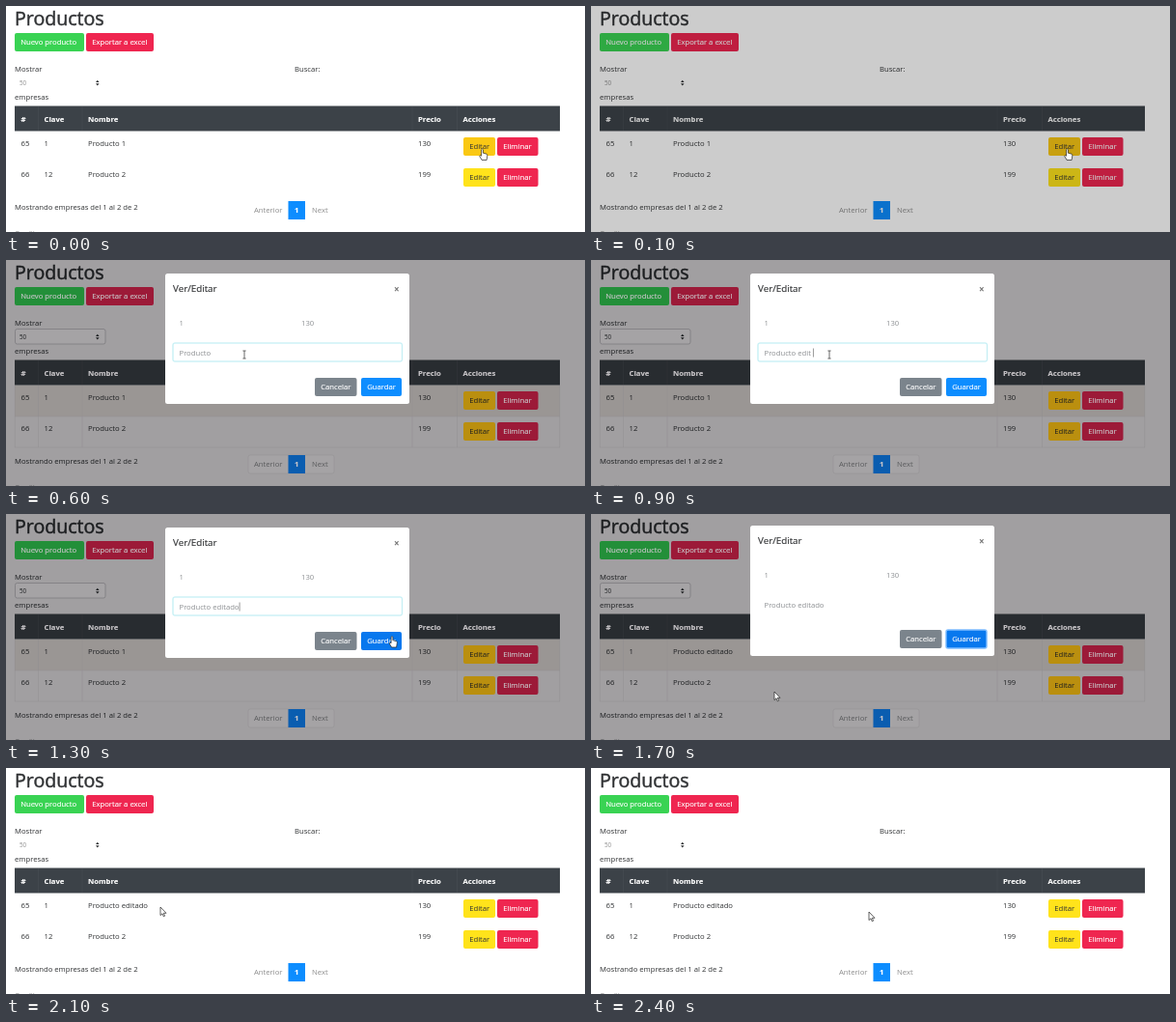
An HTML page for the animation above (2500 ms loop, 600x234 px).

```html
<!DOCTYPE html>
<html lang="es">
<head>
<meta charset="utf-8">
<title>Productos</title>
<style>
  html, body { margin: 0; width: 100%; height: 100%; overflow: hidden; background: #fff; }
  svg { display: block; width: 600px; height: 234px; }
  text { font: 7.7px "Open Sans", "Noto Sans", sans-serif; fill: var(--ink); white-space: pre; }
  svg {
    --page: #fff; --ink: #303234; --stripe: #fff; --line: #fff; --field: #fff;
    --muted: #8c8c8c; --head: #3c4248; --headline: #484f55; --green: #39d353;
    --red: #ef2650; --yellow: #ffe31b; --hover: #fac814; --blue: #0d8dff; --label: #fff;
  }
  svg.dim .page {
    --page: #a19fa1; --ink: #1c1e20; --stripe: #9a9694; --line: #908e90; --field: #a5a3a5;
    --muted: #5a5b5d; --head: #282c30; --headline: #33373b; --green: #238f39;
    --red: #9c1a38; --yellow: #ba8f0f; --hover: #a07c0e; --blue: #0a5db0; --label: #c9c6c9;
  }
  .title { font-size: 19.6px; stroke: var(--ink); stroke-width: .45px; }
  .heading { font-size: 9.8px; stroke: var(--ink); stroke-width: .15px; }
  .bold { font-weight: 700; }
  .label { fill: var(--label); stroke: var(--label); stroke-width: .15px; }
  .muted { fill: var(--muted); }
  .small { font-size: 6.3px; }
  .value { fill: #8c8f92; }
</style>
</head>
<body>
<svg id="stage" viewBox="0 0 600 234"></svg>
<script>
const LOOP = 2500, STEP = 100;
const stage = document.getElementById('stage');

const text = (x, y, str, cls = '', extra = '') =>
  `<text x="${x}" y="${y}" class="${cls}" ${extra}>${str}</text>`;
const rect = (x, y, w, h, fill, extra = '') =>
  `<rect x="${x}" y="${y}" width="${w}" height="${h}" fill="${fill}" ${extra}/>`;
const button = (x, y, w, label, fill, cls = 'label', extra = '') =>
  rect(x, y, w, 19, fill, `rx="2" ${extra}`) + text(x + 6.2, y + 12.4, label, cls);

const columns = [[15.5, '#'], [39.5, 'Clave'], [85, 'Nombre'], [427, 'Precio'], [473.5, 'Acciones']];

function row(y, id, key, name, price, editFill, editExtra) {
  const cells = [id, key, name, price].map((v, i) => text(columns[i][0], y + 15, v)).join('');
  return cells + button(474, y + 6, 33, 'Editar', editFill, '', editExtra) +
    button(509, y + 6, 42.5, 'Eliminar', 'var(--red)');
}

function page({ dim, name, editFill, focusEdit }) {
  const ring = focusEdit ? 'stroke="#86680c" stroke-width="1.2"' : '';
  return '<g class="page">' +
    rect(0, 0, 600, 234, 'var(--page)') +
    text(9, 19.8, 'Productos', 'title') +
    button(9, 28, 72, 'Nuevo producto', 'var(--green)') +
    button(83, 28, 70, 'Exportar a excel', 'var(--red)') +
    text(9, 68.3, 'Mostrar') + text(299, 68.3, 'Buscar:') + text(9, 96.5, 'empresas') +
    rect(9.5, 71.5, 93.5, 15.5, 'var(--field)', `rx="2" stroke="${dim ? '#77767a' : 'none'}" stroke-width=".7"`) +
    text(14, 81.8, '50', 'small ' + (dim ? '' : 'muted')) +
    '<path d="M93 79l1.8-2.3 1.8 2.3zM93 80.2l1.8 2.3 1.8-2.3z" fill="var(--ink)"/>' +
    rect(9, 130, 565, 32, 'var(--stripe)') +
    rect(9, 103.5, 565, 26, 'var(--head)') +
    '<path d="M33.5 104v25M79 104v25M421 104v25M467.5 104v25" stroke="var(--headline)" stroke-width=".6"/>' +
    '<path d="M9 162h565M9 194h565M9.3 130v64M573.7 130v64M33.5 130v64M79 130v64M421 130v64M467.5 130v64" stroke="var(--line)" stroke-width=".5"/>' +
    columns.map(([x, label]) => text(x, 119.5, label, 'bold label')).join('') +
    row(130, 65, 1, name, 130, editFill, ring) +
    row(162, 66, 12, 'Producto 2', 199, 'var(--yellow)', '') +
    text(9, 210.8, 'Mostrando empresas del 1 al 2 de 2') +
    rect(251, 202, 89, 19, 'var(--field)', 'rx="2" stroke="var(--line)" stroke-width=".5"') +
    rect(292.5, 202, 17.5, 19, 'var(--blue)') +
    text(257, 214.4, 'Anterior', 'muted') + text(299, 214.4, '1', 'bold label') + text(317, 214.4, 'Next', 'muted') +
    text(9, 238, 'Creditos', 'muted') + '</g>';
}

function modal({ top, value, focused, caret, saveFill, saveFocused }) {
  const caretX = 180 + value.length * 3.88;
  const field = focused
    ? rect(173, 72, 237.5, 19, '#fff', 'rx="2" stroke="#e2f8fb" stroke-width="1.6"') +
      rect(173, 72, 237.5, 19, 'none', 'rx="2" stroke="#b4e9f0" stroke-width=".6"') : '';
  return `<g transform="translate(0 ${top})">` +
    rect(165, 0, 253, 135, '#fff', 'rx="2.5"') +
    text(173, 19.4, 'Ver/Editar', 'heading') +
    text(402, 19.6, '×', 'heading bold', 'style="fill:#777;stroke:none"') +
    text(179.5, 53.8, '1', 'value') + text(306, 53.8, '130', 'value') + field +
    text(179.5, 84.6, value, 'value') +
    (caret ? `<path d="M${caretX} 77.5v9" stroke="#555" stroke-width=".6"/>` : '') +
    button(320, 108, 43.5, 'Cancelar', '#7b848c') +
    button(368, 108, 42, 'Guardar', saveFill, 'label',
      saveFocused ? 'stroke="#7dbcff" stroke-width="1.4"' : '') + '</g>';
}

const cursors = {
  arrow: '<path d="M0 0V8.6L2 6.8 3.3 9.8 4.6 9.2 3.3 6.3H6z" fill="#fff" stroke="#222" stroke-width=".7"/>',
  beam: '<path d="M-1.6-4H1.6M0-4V4M-1.6 4H1.6" fill="none" stroke="#444" stroke-width=".8"/>',
  hand: '<path d="M-.9.8Q0-.6.9.8V4.2L4.6 5.2Q5.5 5.6 5.3 7L4.6 11.5H-.4L-2.8 7.4Q-2.6 6-.9 7.2z" fill="#fff" stroke="#222" stroke-width=".7"/>'
};
// step, shape, x, y
const track = [
  [0, 'hand', 493.5, 148], [1, 'hand', 493.5, 148], [2, 'beam', 258, 87], [3, 'beam', 248, 97],
  [6, 'beam', 247, 98], [11, 'beam', 247, 98], [12, 'arrow', 335, 115], [13, 'hand', 400, 126.5],
  [15, 'hand', 400, 126.5], [16, 'arrow', 330, 150], [17, 'arrow', 190, 184],
  [18, 'arrow', 15, 134.5], [19, 'arrow', 40, 139], [23, 'arrow', 280, 149], [24, 'arrow', 288, 149]
];

function cursor(k) {
  const i = track.findLastIndex(p => p[0] <= k);
  const [k0, shape, x, y] = track[i];
  const [k1, , nx, ny] = track[i + 1] || track[i];
  const f = k1 > k0 ? (k - k0) / (k1 - k0) : 0;
  return `<g transform="translate(${x + (nx - x) * f} ${y + (ny - y) * f})">${cursors[shape]}</g>`;
}

function typed(k) {
  if (k < 5) return 'Producto 1';
  if (k < 7) return 'Producto';
  return 'Producto editado'.slice(0, 10 + Math.floor((k - 7) * 1.5));
}

function render(k) {
  const open = k >= 2 && k <= 17;
  const focused = k >= 3 && k <= 13;
  stage.setAttribute('class', open ? 'dim' : '');
  stage.innerHTML = page({
    dim: open,
    name: k < 16 ? 'Producto 1' : 'Producto editado',
    editFill: k < 3 ? 'var(--hover)' : 'var(--yellow)',
    focusEdit: k === 2
  }) +
    (k === 1 ? rect(0, 0, 600, 234, '#000', 'opacity=".2"') : '') +
    (open ? modal({
      top: k === 2 ? 5 : k === 17 ? 12 : 14,
      value: typed(k), focused,
      caret: focused && k > 6,
      saveFill: k >= 13 ? '#0878ee' : '#0d8dff',
      saveFocused: k >= 14
    }) : '') + cursor(k);
}

let shown = -1;
const start = performance.now();
function tick() {
  const k = Math.floor(((performance.now() - start) % LOOP) / STEP);
  if (k !== shown) render(shown = k);
  requestAnimationFrame(tick);
}
tick();
</script>
</body>
</html>
```
